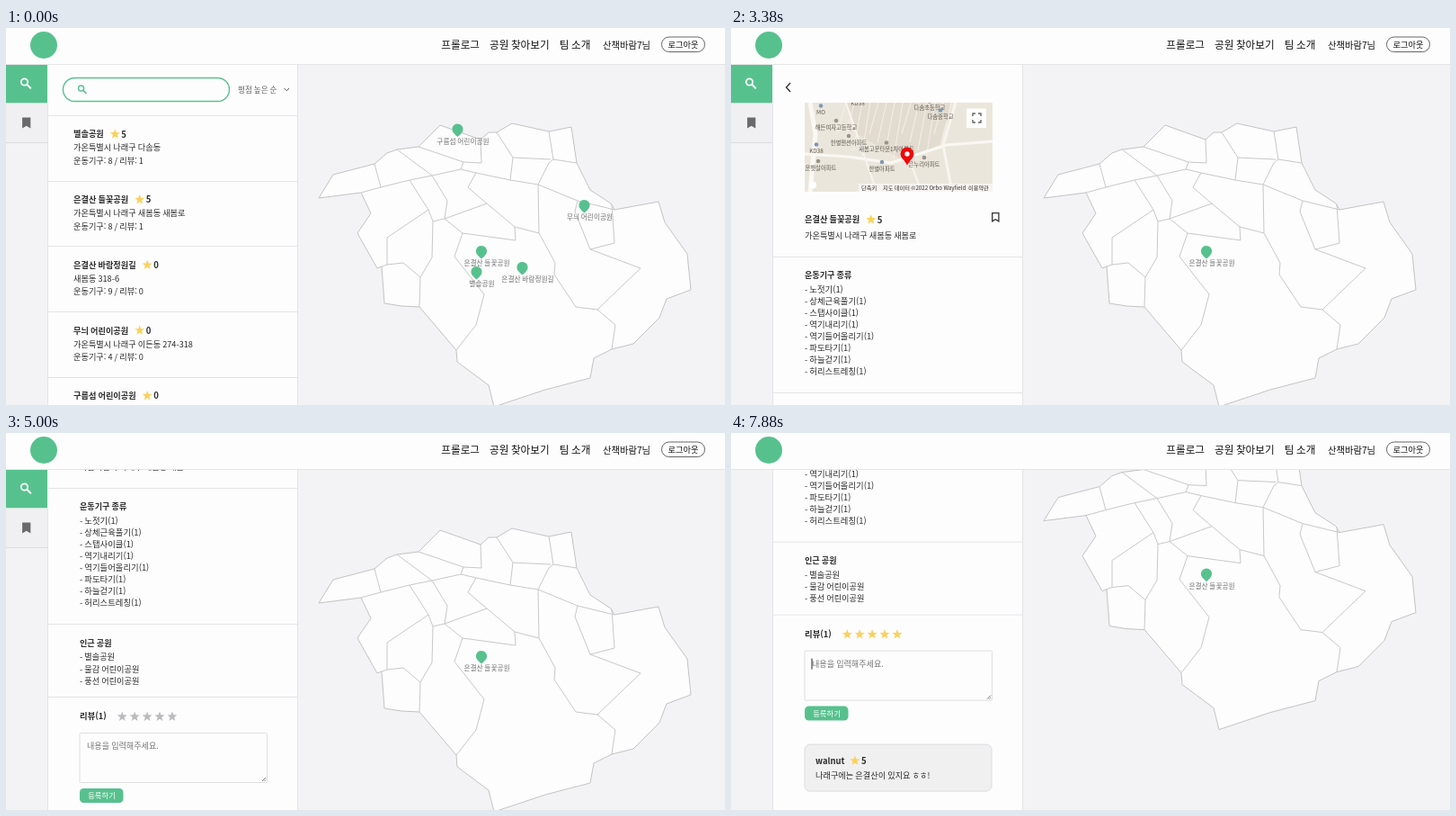
Animation of 800 by 419 pixels, one loop 8 s. Source, as an HTML page with a canvas:

```html
<!DOCTYPE html>
<html lang="ko">
<head>
<meta charset="utf-8">
<style>
html, body { margin: 0; width: 100%; height: 100%; overflow: hidden; background: #f3f2f4; }
canvas { display: block; width: 800px; height: 419px; }
</style>
</head>
<body>
<canvas id="stage" width="800" height="419"></canvas>
<script>
const ctx = document.getElementById('stage').getContext('2d');
const LOOP = 8000, STEP = 125;
const GREEN = '#57c18e', WHITE = '#fefdfe', GRAY = '#f3f2f4', INK = '#2b2b2b', LINE = '#e4e3e5', YELLOW = '#fbd15b';
const KR = '"Noto Sans CJK KR", "Noto Sans CJK", sans-serif';

const parks = [
  { name: '별솔공원', score: 5, address: '가온특별시 나래구 다솜동', gear: 8, reviews: 1, x: 523.5, y: 271 },
  { name: '은결산 들꽃공원', score: 5, address: '가온특별시 나래구 새봄동 새봄로', gear: 8, reviews: 1, x: 529, y: 248 },
  { name: '은결산 바람정원길', score: 0, address: '새봄동 318-6', gear: 9, reviews: 0, x: 574.5, y: 266 },
  { name: '무늬 어린이공원', score: 0, address: '가온특별시 나래구 이든동 274-318', gear: 4, reviews: 0, x: 643.5, y: 197 },
  { name: '구름섬 어린이공원', score: 0, address: '가온특별시 나래구 마루동 1284-7', gear: 5, reviews: 0, x: 502.5, y: 112.5 }
];
const machines = ['노젓기', '상체근육풀기', '스탭사이클', '역기내리기', '역기들어올리기', '파도타기', '하늘걷기', '허리스트레칭'];
const nearby = ['별솔공원', '물감 어린이공원', '풍선 어린이공원'];

const outline = '348,189 364,163 410,151 424,139 435,135 459,132 483,108 528,124 537,116 546,116 563,106 604,115 ' +
  '629,110 635,150 650,180 673,195 677,202 726,193 733,216 758,251 762,291 735,301 727,322 698,351 674,357 ' +
  '654,367 650,389 600,402 543,421 537,397 502,371 501,358 460,310 440,309 421,306 418,265 413,267 391,228 406,206 395,183';
const borders = [
  '395,183 417,177 449,169 474,164 506,157 523,161 561,169 592,174 636,192 677,202',
  '410,151 417,177', '435,135 474,164 491,192 488,212 475,215',
  '459,132 509,149 529,150 528,124', '509,149 506,157',
  '546,116 564,144 561,169', '564,144 606,146', '604,115 609,146 635,150', '609,146 604,150 592,174 593,228',
  '523,161 514,177 523,185 566,221 567,236 508,228 488,212 535,195', '566,221 593,228',
  '593,228 611,261 610,274 634,310 658,313 678,330 674,357',
  '636,192 633,204 650,246 677,239 674,196', '650,246 706,267 658,313',
  '449,169 470,202 475,215 474,255 461,277 460,310', '470,202 424,233 424,263 418,265', '424,263 442,261 461,277',
  '508,228 499,254 532,296 523,330 501,358'
];

// Piecewise linear value from [time, value] pairs.
function track(t, keys) {
  if (t <= keys[0][0]) return keys[0][1];
  for (let i = 1; i < keys.length; i++) {
    const [t0, a] = keys[i - 1], [t1, b] = keys[i];
    if (t < t1) return a + (b - a) * (t - t0) / (t1 - t0);
  }
  return keys[keys.length - 1][1];
}

function text(str, x, y, size = 9.2, { color = INK, weight = 400, align = 'left', font = KR } = {}) {
  ctx.font = `${weight} ${size}px ${font}`;
  ctx.fillStyle = color;
  ctx.textAlign = align;
  ctx.fillText(str, x, y + size * 0.37);
  return ctx.measureText(str).width;
}

function rect(x, y, w, h, color) {
  ctx.fillStyle = color;
  ctx.fillRect(x, y, w, h);
}

function box(x, y, w, h, r, fill, stroke, width = 1) {
  ctx.beginPath();
  ctx.roundRect(x, y, w, h, r);
  paint(fill, stroke, width);
}

function paint(fill, stroke, width = 1) {
  if (fill) { ctx.fillStyle = fill; ctx.fill(); }
  if (stroke) { ctx.strokeStyle = stroke; ctx.lineWidth = width; ctx.stroke(); }
}

function path(points, { fill, stroke, width = 1, close = false } = {}) {
  ctx.beginPath();
  points.split(' ').forEach(p => ctx.lineTo(...p.split(',').map(Number)));
  if (close) ctx.closePath();
  paint(fill, stroke, width);
}

function circle(x, y, r, fill, stroke, width) {
  ctx.beginPath();
  ctx.arc(x, y, r, 0, Math.PI * 2);
  paint(fill, stroke, width);
}

function shifted(dx, dy, draw) {
  ctx.save();
  ctx.translate(dx, dy);
  draw();
  ctx.restore();
}

function clipped(x, y, w, h, draw) {
  ctx.save();
  ctx.beginPath();
  ctx.rect(x, y, w, h);
  ctx.clip();
  draw();
  ctx.restore();
}

function star(x, y, color, r = 5.8) {
  ctx.beginPath();
  for (let i = 0; i < 10; i++) {
    const a = i * Math.PI / 5 - Math.PI / 2, d = i % 2 ? r * 0.42 : r;
    ctx.lineTo(x + d * Math.cos(a), y + d * Math.sin(a));
  }
  ctx.closePath();
  paint(color);
}

function magnifier(x, y, scale, color) {
  circle(x - 1.3 * scale, y - 1.3 * scale, 3.2 * scale, null, color, 1.5 * scale);
  ctx.beginPath();
  ctx.moveTo(x + 1.2 * scale, y + 1.2 * scale);
  ctx.lineTo(x + 5 * scale, y + 5 * scale);
  paint(null, color, 1.7 * scale);
}

function bookmark(x, y, w, h, fill, stroke) {
  shifted(x, y, () => path(`${-w},${-h} ${w},${-h} ${w},${h} 0,${h * 0.55} ${-w},${h}`, { fill, stroke, width: 1.3, close: true }));
}

function pin(x, y, r, color) {
  ctx.beginPath();
  ctx.arc(x, y, r, Math.PI * 0.88, Math.PI * 0.12);
  ctx.quadraticCurveTo(x + r * 0.75, y + r * 0.75, x, y + r * 1.4);
  ctx.quadraticCurveTo(x - r * 0.75, y + r * 0.75, x - r * 0.93, y + r * 0.37);
  paint(color);
}

function titleWithScore(park, x, y) {
  const end = x + text(park.name, x, y, 9.2, { weight: 700 });
  star(end + 12.5, y, YELLOW);
  text(park.score, end + 19.5, y, 9.6, { weight: 700 });
}

function divider(y) { rect(47, y, 277, 1, LINE); }

function drawDistrict(detail) {
  path(outline, { fill: WHITE, stroke: '#c4c3c4', close: true });
  borders.forEach(b => path(b, { stroke: '#c9c8c9' }));
  parks.forEach((p, i) => {
    if (detail && i !== 1) return;
    pin(p.x, p.y, 6.1, GREEN);
    text(p.name, p.x + 6, p.y + 13.3, 7.7, { color: '#707070', align: 'center' });
  });
}

function drawSidebar() {
  rect(0, 40, 46, 43.5, GREEN);
  magnifier(22, 61.5, 1.15, '#fff');
  rect(0, 83.5, 46, 44, '#f0eff1');
  rect(0, 127, 46, 1, '#dddcde');
  bookmark(22.7, 105.5, 4.6, 6, '#6a696c');
}

function drawList(scroll) {
  box(63.5, 55.5, 185, 26, 13, WHITE, GREEN, 1.4);
  magnifier(84.8, 68.3, 0.95, GREEN);
  text('평점 높은 순', 258, 68.5, 8.6, { color: '#666' });
  path('309.5,67 312.3,69.8 315,67', { stroke: '#555' });
  clipped(47, 90, 277, 329, () => shifted(0, -scroll, () => parks.forEach((p, i) => {
    const y = 118 + i * 72.7;
    divider(Math.round(y - 21));
    titleWithScore(p, 75, y);
    text(p.address, 75, y + 15);
    text(`운동기구: ${p.gear} / 리뷰: ${p.reviews}`, 75, y + 29.6);
  })));
}

function drawMiniMap() {
  clipped(82, 83, 209, 99, () => {
    rect(82, 83, 209, 99, '#ebe6dc');
    path('128,83 245,83 232,130 190,146 140,118', { fill: '#e2dbcf', close: true });
    for (let i = 0; i < 14; i++) {
      path(`${128 + i * 9},83 ${118 + i * 9},${118 + i % 4 * 9}`, { stroke: '#f4f0e8' });
    }
    path('82,140 130,143 178,150 240,130 291,126', { stroke: '#faf8f3', width: 3 });
    path('88,83 94,118 88,182', { stroke: '#faf8f3', width: 5 });
    path('128,83 140,118 162,182', { stroke: '#f8f5ee', width: 2 });
    path('250,83 236,130 246,182', { stroke: '#f8f5ee', width: 3 });
    path('200,150 212,182', { stroke: '#f8f5ee', width: 2 });
    const places = [['MO', 100, 94], ['KD38', 141, 84], ['다솜초등학교', 221, 89], ['다솜중학교', 233, 99],
      ['해든여자고등학교', 117, 110.5], ['한별맨션아파트', 131, 127.5], ['KD38', 95, 137], ['새봄고운타운1차아파트', 173, 135],
      ['고운햇살아파트', 97, 155.5], ['한별아파트', 168, 156.5], ['은누리아파트', 215, 151.5]];
    places.forEach(([name, x, y], i) => {
      circle(x, y - 7.5, 2.3, i % 3 ? '#9a9389' : '#7f98b5');
      text(name, x, y, 6.3, { color: '#5d574e', align: 'center' });
    });
    circle(91, 174.5, 4, '#fff');
    rect(142, 173, 149, 9, 'rgba(250,248,245,.8)');
    text('단축키', 145, 177.5, 6.2);
    text('지도 데이터 ©2022 Orbo Wayfield', 169, 177.5, 6.2);
    text('이용약관', 264, 177.5, 6.2);
    box(262, 89.5, 22, 21.5, 1, '#fff');
    ['269,98 269,95 272,95', '275,95 278,95 278,98', '278,102 278,105 275,105', '272,105 269,105 269,102']
      .forEach(p => path(p, { stroke: '#666', width: 1.4 }));
    pin(196, 140, 7.4, '#f00808');
    path('190,143 196,152.5 202,143', { fill: '#f00808', close: true });
    circle(196, 140, 2.7, '#fff');
  });
}

function drawDetail(scroll, rating, caret) {
  clipped(47, 40, 277, 560, () => shifted(0, -scroll, () => {
    path('66,61 61.5,66 66,71', { stroke: '#333', width: 1.4 });
    drawMiniMap();
    titleWithScore(parks[1], 82, 213);
    bookmark(294.3, 210.2, 3.6, 4.6, null, '#333');
    text(parks[1].address, 82, 230.5);
    divider(254);
    text('운동기구 종류', 82, 275, 9.1, { weight: 700 });
    machines.forEach((m, i) => text(`- ${m}(1)`, 82, 290.3 + i * 13.1, 9.4));
    divider(405);
    text('인근 공원', 82, 426.5, 9.1, { weight: 700 });
    nearby.forEach((n, i) => text(`- ${n}`, 82, 442 + i * 13.2, 9.2));
    divider(486);
    text('리뷰(1)', 82, 508, 9.4, { weight: 700 });
    for (let i = 0; i < 5; i++) star(129.3 + i * 13.9, 508.3, i < rating ? YELLOW : '#bbbabc');
    box(82, 526.5, 208.5, 55, 1, WHITE, '#dfdee0');
    text('내용을 입력해주세요.', 90, 541, 9.1, { color: '#757575' });
    if (caret) rect(89.5, 535, 1, 12, '#222');
    path('285,580 289,576', { stroke: '#777' });
    path('287.5,580 289,578.5', { stroke: '#777' });
    box(82, 588, 48.5, 16, 4.5, GREEN);
    text('등록하기', 106.5, 596.2, 8.3, { color: '#fff', align: 'center' });
    box(82, 630.5, 208, 52, 6, '#f1f0f1', '#dcdbdd');
    const end = 94 + text('walnut', 94, 648.7, 9.4, { weight: 700 });
    star(end + 11.5, 648.7, YELLOW);
    text('5', end + 18.5, 648.7, 9.6, { weight: 700 });
    text('나래구에는 은결산이 있지요 ㅎㅎ!', 94, 664.8);
  }));
}

function drawHeader(opacity) {
  rect(0, 0, 800, 40, `rgba(254,253,254,${opacity})`);
  rect(0, 40, 800, 1, '#e5e4e6');
  circle(42, 19, 15, GREEN);
  text('프롤로그', 484.3, 18.7, 11.6, { color: '#111' });
  text('공원 찾아보기', 538, 18.7, 11.6, { color: '#111' });
  text('팀 소개', 615.8, 18.7, 11.6, { color: '#111' });
  text('산책바람7님', 664, 18.7, 10.3, { color: '#111' });
  box(729.5, 10, 48, 16.5, 8.2, WHITE, '#555', 0.9);
  text('로그아웃', 753.5, 18.5, 9.2, { color: '#111', align: 'center' });
}

function drawStatus() {
  box(-3, 409, 119, 13, 2, '#2c2c2e');
  text('https://todaypark.site/search/detail/14', 2, 414, 6.1, { color: '#eee', font: '"Open Sans", sans-serif' });
}

function draw(t) {
  const detail = t >= 3250;
  const pageScroll = track(t, [[5750, 0], [6000, 75], [6125, 91.4]]);
  const headerOpacity = t < 5875 ? 1 : track(t, [[6250, 0], [6500, 1]]);
  rect(0, 0, 800, 419, GRAY);
  shifted(0, -pageScroll, () => {
    drawDistrict(detail);
    drawSidebar();
    rect(46.5, 40, 278, 600, WHITE);
    rect(46, 84, 1, 556, LINE);
    rect(324, 40, 1, 600, LINE);
    if (detail) {
      const scroll = track(t, [[3625, 0], [3875, 30], [4125, 85], [4375, 140], [4625, 180], [4875, 193]]);
      drawDetail(scroll, Math.floor(track(t, [[6875, 0], [7375, 5]])), t >= 7625);
    } else {
      drawList(track(t, [[1375, 0], [1625, 4]]));
    }
  });
  drawHeader(headerOpacity);
  if (t >= 500 && !detail) drawStatus();
}

const start = performance.now();
function tick() {
  const t = (performance.now() - start) % LOOP;
  draw(Math.floor(t / STEP) * STEP);
  requestAnimationFrame(tick);
}
tick();
</script>
</body>
</html>
```
